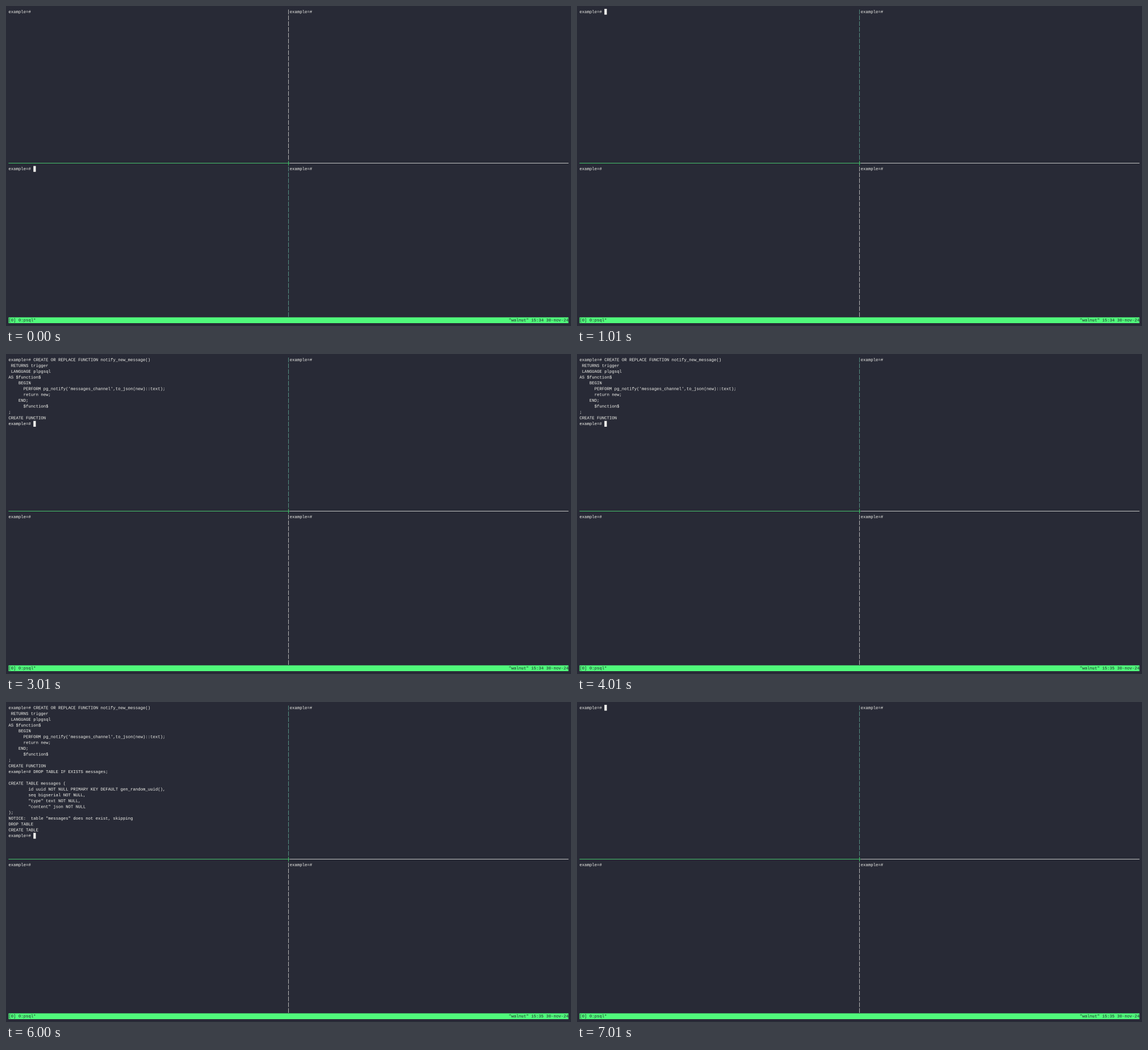
Recreate the animation shown at these times as an HTML page with a canvas. Size 995 by 563 pixels, loop 8000 ms.

```html
<!DOCTYPE html>
<html lang="en">
<head>
<meta charset="utf-8">
<title>Terminal session</title>
<style>
html, body { margin: 0; width: 100%; height: 100%; overflow: hidden; background: #282a36; }
canvas { display: block; width: 995px; height: 563px; }
</style>
</head>
<body>
<canvas id="stage" width="995" height="563"></canvas>
<script>
const W = 995, H = 563, LOOP = 8000;
const COLS = 225, ROWS = 54, MID_COL = 112, MID_ROW = 26;
const CW = W / (COLS + 2), RH = H / (ROWS + 1);
const X0 = CW, Y0 = RH / 2, SIZE = CW / 0.6001;
const BG = '#282a36', FG = '#f8f8f2', GREEN = '#50fa7b', INK = '#21222c';
const PROMPT = 'example=# ';

const createFunction = [
  'CREATE OR REPLACE FUNCTION notify_new_message()',
  ' RETURNS trigger',
  ' LANGUAGE plpgsql',
  'AS $function$',
  '    BEGIN',
  "      PERFORM pg_notify('messages_channel',to_json(new)::text);",
  '      return new;',
  '    END;',
  '      $function$',
  ';'
];
const createTable = [
  'DROP TABLE IF EXISTS messages;',
  '',
  'CREATE TABLE messages (',
  '        id uuid NOT NULL PRIMARY KEY DEFAULT gen_random_uuid(),',
  '        seq bigserial NOT NULL,',
  '        "type" text NOT NULL,',
  '        "content" json NOT NULL',
  ');'
];
const tableReply = [
  'NOTICE:  table "messages" does not exist, skipping',
  'DROP TABLE',
  'CREATE TABLE'
];

// Text is drawn on an enlarged buffer for sub-pixel glyph placement.
const ZOOM = 4;
const buffer = document.createElement('canvas');
buffer.width = W * ZOOM;
buffer.height = H * ZOOM;
const g = buffer.getContext('2d');
const out = document.getElementById('stage').getContext('2d');
out.imageSmoothingEnabled = true;
out.imageSmoothingQuality = 'high';

const snap = v => Math.round(v * ZOOM) / ZOOM;

function fillCells(col, row, count, color) {
  const x = snap(X0 + col * CW), y = snap(Y0 + row * RH);
  g.fillStyle = color;
  g.fillRect(x, y, snap(X0 + (col + count) * CW) - x, snap(Y0 + (row + 1) * RH) - y);
}

function write(str, col, row, color = FG) {
  g.fillStyle = color;
  [...str].forEach((ch, i) => {
    if (ch !== ' ') g.fillText(ch, X0 + (col + i) * CW, Y0 + row * RH + SIZE);
  });
}

function writeMarked(str, col, row) {
  fillCells(col, row, str.length, FG);
  write(str, col, row, BG);
}

// Prints a block after the prompt and returns the next free row.
function command(lines, row, marked) {
  write(PROMPT, 0, row);
  lines.forEach((line, i) => {
    (marked ? writeMarked : write)(line, i ? 0 : PROMPT.length, row + i);
  });
  return row + lines.length;
}

function promptWithCursor(row) {
  write(PROMPT, 0, row);
  fillCells(PROMPT.length, row, 1, FG);
}

function borders(topActive) {
  const x = 497, y = 276;
  for (let row = 0; row < ROWS - 1; row++) {
    const active = row === MID_ROW || (row < MID_ROW) === topActive;
    g.fillStyle = row === MID_ROW ? '#46c46c' : active ? '#568f83' : '#b4b5b5';
    g.fillRect(x, Y0 + row * RH + SIZE * 0.167, 1, SIZE * 1.133);
  }
  const split = X0 + (MID_COL + 1) * CW;
  g.fillStyle = '#46c46c';
  g.fillRect(X0, y, split - X0, 1);
  g.fillStyle = '#c4c5c4';
  g.fillRect(split, y, X0 + COLS * CW - split, 1);
}

function statusBar(minute) {
  const right = `"walnut" 15:${minute} 30-nov-24`;
  fillCells(0, ROWS - 1, COLS, GREEN);
  write('[0] 0:psql*', 0, ROWS - 1, INK);
  write(right, COLS - right.length, ROWS - 1, INK);
}

function functionDone() {
  const row = command(createFunction, 0);
  write('CREATE FUNCTION', 0, row);
  return row + 1;
}

const steps = [
  { at: 0, bottom: true, pane() { write(PROMPT, 0, 0); } },
  { at: 1010, pane() { promptWithCursor(0); } },
  { at: 2010, pane() { fillCells(0, command(createFunction, 0, true), 1, FG); } },
  { at: 3010, pane() { promptWithCursor(functionDone()); } },
  { at: 4010, pane() { promptWithCursor(functionDone()); } },
  { at: 5010, pane() { fillCells(0, command(createTable, functionDone(), true), 1, FG); } },
  { at: 6000, pane() {
    const row = command(createTable, functionDone());
    tableReply.forEach((line, i) => write(line, 0, row + i));
    promptWithCursor(row + tableReply.length);
  } },
  { at: 7010, pane() { promptWithCursor(0); } }
];

function draw(step) {
  g.setTransform(ZOOM, 0, 0, ZOOM, 0, 0);
  g.font = `${SIZE}px "Liberation Mono", monospace`;
  g.textBaseline = 'alphabetic';
  g.fillStyle = BG;
  g.fillRect(0, 0, W, H);
  borders(!step.bottom);
  step.pane();
  if (step.bottom) promptWithCursor(MID_ROW + 1);
  else write(PROMPT, 0, MID_ROW + 1);
  write(PROMPT, MID_COL + 1, 0);
  write(PROMPT, MID_COL + 1, MID_ROW + 1);
  statusBar(step.at < 4010 ? 34 : 35);
  out.drawImage(buffer, 0, 0, W, H);
}

const start = performance.now();
let shown = null;
function tick() {
  const t = (performance.now() - start) % LOOP;
  const step = steps.findLast(s => s.at <= t);
  if (step !== shown) draw(shown = step);
  requestAnimationFrame(tick);
}
tick();
</script>
</body>
</html>
```
